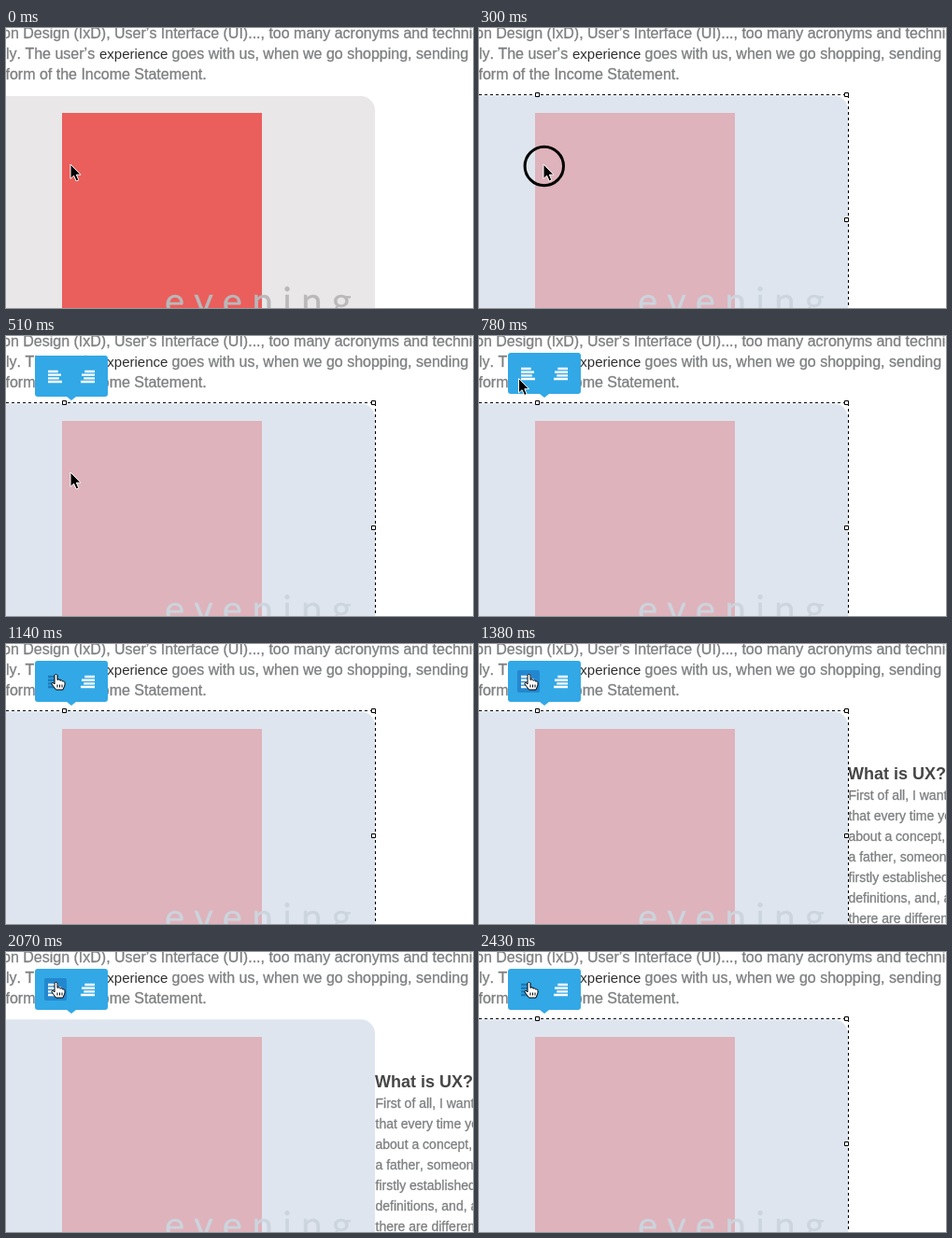
These frames come from a looping animation (500x300 px, 3.43 s). An HTML page:

```html
<!DOCTYPE html>
<html lang="en">
<head>
<meta charset="utf-8">
<style>
html, body { margin: 0; width: 100%; height: 100%; overflow: hidden; background: #fff; }
svg { display: block; width: 500px; height: 300px; }
text { font: 16px "Liberation Sans", Arial, sans-serif; fill: #7d7f80; stroke: #7d7f80; stroke-width: .3px; font-kerning: none; white-space: pre; }
.strong { font-size: 15px; fill: #2f2f2f; stroke: none; }
.head { font-size: 18px; font-weight: bold; fill: #464646; stroke: none; }
.body { font-size: 14px; }
.word { font: 40px Lato, sans-serif; letter-spacing: 10.5px; fill: #bab8b9; stroke: #bab8b9; }
</style>
</head>
<body>
<svg viewBox="0 0 500 300">
  <text x="-4" y="11">on Design (IxD), User’s Interface (UI)..., too many acronyms and technicalities</text>
  <text x="0" y="33">ly. The user’s </text>
  <text x="100" y="33" class="strong">experience</text>
  <text x="177.5" y="33">goes with us, when we go shopping, sending</text>
  <text x="-.5" y="55">form of the Income Statement.</text>

  <g id="article">
    <text x="395" y="145" class="head">What is UX?</text>
  </g>

  <rect x="-40" y="73" width="435" height="260" rx="15" fill="#e9e7e8"/>
  <rect x="60" y="91" width="214" height="214" fill="#ea5e5c"/>
  <text x="170" y="307" class="word">evening</text>
  <rect id="tint" x="-40" y="72" width="435" height="260" rx="15" fill="#d7e4f3" opacity=".63"/>

  <g id="frame" stroke="#000" fill="none">
    <path d="M0 71.5H395.5V300" stroke-dasharray="3"/>
    <path d="M60.5 69.5h4v4h-4zM391.5 69.5h4v4h-4zM391.5 203.5h4v4h-4z" fill="#fff"/>
  </g>

  <g id="bar">
    <path d="M34 18H106a3 3 0 0 1 3 3V59a3 3 0 0 1-3 3H75L70 66 65 62H34a3 3 0 0 1-3-3V21a3 3 0 0 1 3-3z" fill="#32a8e6"/>
    <rect id="pressed" x="41" y="28" width="24" height="24" rx="2" fill="#2387cf"/>
    <g stroke-width="2.4">
      <path id="left" d="M45 35h10.7M45 38.7h14M45 42.4h11.8M45 46h15"/>
      <path d="M95 35h-10.7M95 38.7h-14M95 42.4h-11.8M95 46h-15" stroke="#fff"/>
    </g>
  </g>

  <circle id="ring" r="20.7" fill="none" stroke="#000" stroke-width="3"/>
  <g id="cursor" stroke-linejoin="round">
    <path id="arrow" d="M0 0V15.5L3.6 12.2 6.2 18 8.8 16.8 6.3 11.2H11z" fill="#000" stroke="#fff"/>
    <g id="hand" stroke="#000">
      <path d="M-3 1C-3-1 0-1 0 1V5.5C1 4.3 3 5 3 6.3 4 5.3 5.7 6 5.7 7.2 7 6.5 8 7.3 8 8.5V11L6 16H-1.5L-6 10C-6.5 8.3-5-7.7-4 9L-3 10z" fill="none" stroke="none"/>
      <path d="M-3 1C-3-1 0-1 0 1V5.5C1 4.3 3 5 3 6.3 4 5.3 5.7 6 5.7 7.2 7 6.5 8 7.3 8 8.5V11L6 16H-1.5L-6 10C-6.5 8.3-5 8-4 9L-3 10z" fill="#fff"/>
      <path d="M0 10.5v3M2.5 10.5v3M5 10.5v3"/>
    </g>
  </g>
</svg>
<script>
const LOOP = 3430;
const CLICKS = [[240, 69, 148], [1170, 55, 32], [2220, 55, 32]];
const PATH = [[540, 69, 146], [750, 42, 46], [1020, 55, 33]];
const LINES = ['First of all, I want', 'that every time you', 'about a concept, or', 'a father, someone',
  'firstly established', 'definitions, and, as', 'there are different'];

const $ = id => document.getElementById(id);
const show = (id, on) => $(id).style.display = on ? '' : 'none';
const within = (t, a, b) => t >= a && t < b;
const clamp = v => Math.min(1, Math.max(0, v));
const ease = v => v * v * (3 - 2 * v);

LINES.forEach((line, i) => {
  const row = document.createElementNS('http://www.w3.org/2000/svg', 'text');
  row.setAttribute('x', 395.5);
  row.setAttribute('y', 167 + 22 * i);
  row.setAttribute('class', 'body');
  row.textContent = line;
  $('article').append(row);
});

function pointer(t) {
  let [, x, y] = PATH[0];
  for (let i = 1; i < PATH.length; i++) {
    const [t0, x0, y0] = PATH[i - 1], [t1, x1, y1] = PATH[i];
    if (t < t0) break;
    const k = ease(clamp((t - t0) / (t1 - t0)));
    x = x0 + (x1 - x0) * k;
    y = y0 + (y1 - y0) * k;
  }
  return [x, y];
}

function draw(t) {
  const active = within(t, 1320, 2370);
  const hover = t >= 870;
  show('tint', t >= 240);
  show('frame', t >= 240 && !within(t, 2010, 2160));
  show('article', active);
  show('pressed', active);
  $('left').setAttribute('stroke', hover && !active ? '#1c7ab8' : '#fff');

  const rise = clamp((t - 420) / 180);
  $('bar').setAttribute('opacity', clamp(rise * 2));
  $('bar').setAttribute('transform', `translate(0 ${12 * (1 - rise) ** 2})`);

  const click = CLICKS.find(([start]) => within(t, start, start + 180));
  show('ring', click);
  if (click) {
    const [start, x, y] = click;
    $('ring').setAttribute('transform', `translate(${x + .8} ${y})`);
    $('ring').setAttribute('opacity', clamp((start + 180 - t) / 90));
  }

  $('cursor').setAttribute('transform', `translate(${pointer(t)})`);
  show('arrow', !hover);
  show('hand', hover);
}

const begin = performance.now();
function tick() {
  draw((performance.now() - begin) % LOOP);
  requestAnimationFrame(tick);
}
tick();
</script>
</body>
</html>
```
